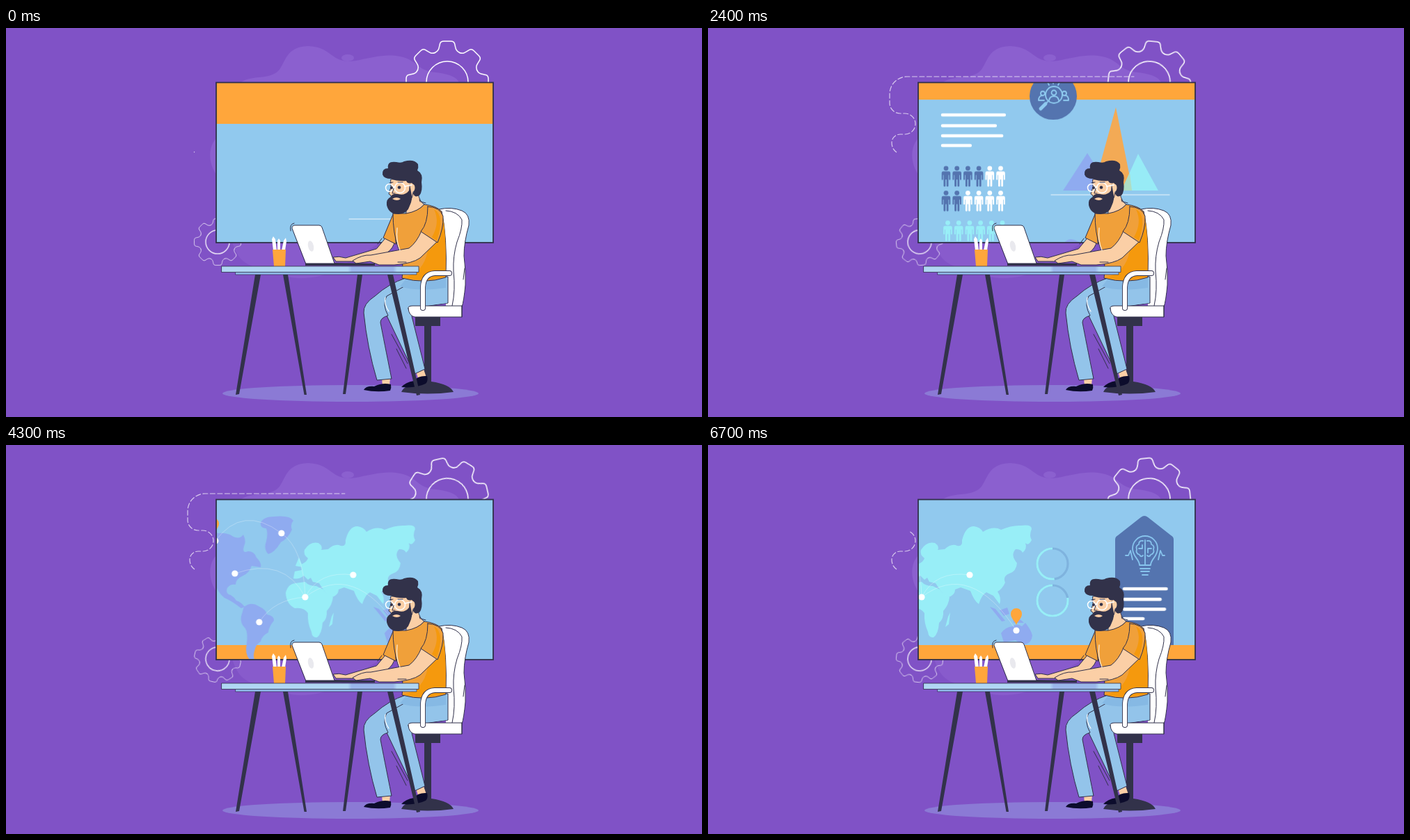
Animation, 1000 px wide and 560 px high, one loop 6.8 s. Source, as an HTML page without scripts:

```html
<!DOCTYPE html>
<html lang="en">
<head>
<meta charset="utf-8">
<title>Analyst at work</title>
<style>
html,body{margin:0;width:100%;height:100%;overflow:hidden;background:#8052c6}
svg{display:block;width:100%;height:100%}
.a{animation:6.8s linear infinite}
.ink{stroke:#30304a;stroke-width:1;stroke-linejoin:round;stroke-linecap:round}
.line{fill:none;stroke:#fff;stroke-linecap:round;stroke-linejoin:round}
.keep *{vector-effect:non-scaling-stroke}
.navy{fill:#5474af}.aqua{fill:#98eef7}.peri{fill:#8fabf0}.gold{fill:#ffa63b}.shirt{fill:#f0a03a}.skin{fill:#fbcfa6}.denim{fill:#93c4ea}.dark{fill:#32324a}.white{fill:#fff}

/* gears */
.spin{animation-name:spin}
@keyframes spin{0%{transform:rotate(0)}27.94%{transform:rotate(145deg)}41.18%{transform:rotate(218deg)}55.88%{transform:rotate(305deg)}63.24%{transform:rotate(347deg)}75%{transform:rotate(396deg)}98.53%{transform:rotate(534deg)}100%{transform:rotate(540deg)}}
.unspin{animation-name:unspin}
@keyframes unspin{0%{transform:rotate(0)}27.94%{transform:rotate(-145deg)}41.18%{transform:rotate(-218deg)}55.88%{transform:rotate(-305deg)}63.24%{transform:rotate(-347deg)}75%{transform:rotate(-396deg)}98.53%{transform:rotate(-534deg)}100%{transform:rotate(-540deg)}}

/* dashed trail grows, then winds back */
.trail{stroke-dasharray:600 700;animation-name:trail}
@keyframes trail{0%{stroke-dashoffset:599}27.94%{stroke-dashoffset:208.5}40.8%,47%{stroke-dashoffset:23.5}55.88%{stroke-dashoffset:134.5}63.24%{stroke-dashoffset:227.5}75%{stroke-dashoffset:378.5}98.53%{stroke-dashoffset:518}100%{stroke-dashoffset:522}}
.swoosh{stroke-dasharray:90 400;animation-name:swoosh}
@keyframes swoosh{0%,23.5%{stroke-dashoffset:91}27%,28.7%{stroke-dashoffset:0}32.4%,100%{stroke-dashoffset:-91}}
.chip{animation-name:chip}
@keyframes chip{0%,38.2%{transform:translate(440px,96px)}41.18%{transform:translate(464px,8px)}42.6%,100%{transform:translate(474px,-30px)}}

/* camera */
.pan-y{animation-name:pan-y}
@keyframes pan-y{0%,31%{transform:none;animation-timing-function:ease-in}41.18%{transform:translateY(-147px);animation-timing-function:ease-out}50%,100%{transform:translateY(-221px)}}
.pan-x{animation-name:pan-x}
@keyframes pan-x{0%,53%{transform:none}55.88%{transform:translateX(-3px);animation-timing-function:ease-in}63.24%{transform:translateX(-243px);animation-timing-function:ease-out}73.5%,100%{transform:translateX(-366px)}}

/* screen parts */
.badge{animation-name:badge}
@keyframes badge{0%,6%{transform:scale(0);animation-timing-function:ease-out}13%{transform:scale(1.1)}15.5%,100%{transform:none}}
.panel{animation-name:panel}
@keyframes panel{0%,15%{transform:translateX(-150px);animation-timing-function:ease-out}27.94%{transform:translateX(-26px);animation-timing-function:ease-out}34%,100%{transform:none}}
.peaks{animation-name:peaks}
@keyframes peaks{0%,29.5%{transform:scaleY(0);animation-timing-function:ease-out}38%,100%{transform:none}}
.arrow{animation-name:arrow}
@keyframes arrow{0%,41.5%{transform:translateX(-185px);animation-timing-function:ease-out}51%,100%{transform:none}}
.floor{animation-name:floor}
@keyframes floor{0%,64%{transform:scaleX(.77)}74%,100%{transform:none}}
.pin{animation-name:pin}
@keyframes pin{0%,44%{transform:scale(0);animation-timing-function:ease-out}50%,100%{transform:none}}
.blip{animation-name:blip}
@keyframes blip{0%,52%{transform:scale(0)}55.88%{transform:scale(.8)}62%,100%{transform:scale(0)}}
.house{animation-name:house}
@keyframes house{0%,65%{transform:translateY(200px)}75%{transform:translateY(12px);animation-timing-function:ease-out}79%,100%{transform:none}}
.rings{animation-name:rings}
@keyframes rings{0%,69%{transform:translateY(-190px)}75%{transform:translateY(-71px);animation-timing-function:ease-out}83%,100%{transform:none}}
.fill{stroke-dasharray:100 200;animation-name:fill}
@keyframes fill{0%,83%{stroke-dashoffset:100.5;animation-timing-function:ease-out}98%,100%{stroke-dashoffset:var(--to)}}
.idea{animation-name:idea}
@keyframes idea{0%,79%{transform:scale(0);animation-timing-function:ease-out}86%,100%{transform:none}}
.notes{animation-name:notes}
@keyframes notes{0%,82%{transform:scaleX(0);visibility:hidden;animation-timing-function:ease-out}82.1%{visibility:visible}93%,100%{transform:none;visibility:visible}}
</style>
</head>
<body>
<svg viewBox="0 0 1000 560">
<defs>
  <path id="tooth" d="M-17.6-42.5C-11.6-45-12-50-10.500-55.500Q-9.500-59-5-59H5Q9.500-59 10.500-55.500C12-50 11.600-45 17.600-42.500"/>
  <g id="teeth2"><use href="#tooth"/><use href="#tooth" transform="rotate(45)"/></g>
  <g id="gear" class="line keep" stroke-width="1.500">
    <use href="#teeth2"/><use href="#teeth2" transform="rotate(90)"/><use href="#teeth2" transform="rotate(180)"/><use href="#teeth2" transform="rotate(270)"/>
    <circle r="30"/>
  </g>
  <g id="person">
    <circle cy="3.800" r="3.400"/>
    <path d="M-6.300 10.500q0-2.200 2.200-2.200h8.200q2.200 0 2.200 2.200v9.500q-1 1.200-2 0v-6.500h-.8V29.500q-1.400 1.600-2.800 0V20h-1.400V29.500q-1.400 1.600-2.800 0V13.500h-.8v6.500q-1 1.200-2 0z"/>
  </g>
  <g id="pair"><use href="#person"/><use href="#person" x="15.700"/></g>
  <path id="notes" d="M0 0H96M0 15.500H82M0 30H92M0 44H43" class="line" stroke-width="4.600" vector-effect="non-scaling-stroke"/>
  <path id="pin" class="gold" d="M0 0C-2-6-8-9-8-16A8 8 0 0 1 8-16C8-9 2-6 0 0Z"/>
  <path id="ring" d="M0-22a22 22 0 0 0 0 44a22 22 0 0 0 0-44" pathLength="100"/>
  <path id="route" d="M271 179Q264 174 264 165A12 12 0 0 1 276 153H283A15 15 0 0 0 283 123H276A15 15 0 0 1 261 108V95A25 25 0 0 1 286 70H700"/>
  <mask id="reveal" maskUnits="userSpaceOnUse" x="0" y="0" width="1000" height="560">
    <use href="#route" class="a trail" fill="none" stroke="#fff" stroke-width="5"/>
  </mask>
  <clipPath id="pane"><path d="M302 79H700V309H302Z"/></clipPath>
  <linearGradient id="top"><stop offset=".64" stop-color="#b0d6f3"/><stop offset=".66" stop-color="#9ab6ea"/><stop offset=".87" stop-color="#9ab6ea"/><stop offset=".89" stop-color="#b0d6f3"/></linearGradient>
</defs>

<rect width="1000" height="560" fill="#8052c6"/>
<g fill="#8b60cf">
  <path d="M335 80C352 66 378 76 392 61C402 49 402 27 434 26C466 27 466 47 492 48C520 46 538 36 566 41C592 46 590 62 618 64C642 67 648 72 652 80Z"/>
  <ellipse cx="491" cy="43" rx="9" ry="5"/>
  <path d="M303 158C290 170 290 195 303 212Z"/>
  <path d="M325 308C335 340 350 344 380 348C405 364 440 364 470 350L540 308Z" fill="#885bcc"/>
</g>
<ellipse cx="495" cy="526" rx="184" ry="12" fill="#8b7ad5"/>

<g transform="translate(634 78)"><g class="a spin"><use href="#gear"/></g></g>
<g transform="translate(304 308) scale(.568)" opacity=".8"><g class="a unspin"><use href="#gear"/></g></g>
<use href="#route" class="line" stroke-width="1.200" stroke-dasharray="7 3.500" opacity=".7" mask="url(#reveal)"/>
<path class="a swoosh line" d="M398 362Q360 345 338 300" stroke-width="9" style="stroke-linecap:butt"/>
<g class="a chip"><path class="white" d="M-6-3L6-4L6 3L-5 4Z"/><path fill="#e6d5f5" d="M-6-3L-2-3L-1 4L-5 4Z"/></g>

<!-- screen -->
<g clip-path="url(#pane)">
  <rect x="302" y="78" width="398" height="231" fill="#91c9ee"/>

  <g class="a house">
    <path class="navy" d="M585 136Q585 132 589 130L622 104Q627 100 632 104L665 130Q669 132 669 136V330H585Z"/>
    <g transform="translate(628 156)"><g class="a idea line" style="stroke:#86c3ec" stroke-width="1.800">
      <path d="M-8 17C-8 8-18 5-18-7A18 18 0 0 1 18-7C18 5 8 8 8 17ZM-7 22H7M-6 26H6M-4 31H4M0-19V17"/>
      <path d="M-3-18Q-9-19-9-13Q-14-11-12-6Q-14 0-8 2Q-6 6-3 3M3-18Q9-19 9-13Q14-11 12-6Q14 0 8 2Q6 6 3 3M-9-7H-4V-12M9-7H4V-1"/>
      <path d="M-28 3H-24L-21-4L-18 9M28 3H25L22-4L19 9"/>
    </g></g>
    <g transform="translate(598 207)"><g class="a notes"><use href="#notes" transform="scale(.63 .98)"/></g></g>
  </g>

  <g class="a rings" fill="none" stroke-width="3.200">
    <g transform="translate(495 171)">
      <use href="#ring" stroke="#7fb3de"/><use href="#ring" class="a fill" stroke="#98eef7" style="--to:48"/>
    </g>
    <g transform="translate(495 224)">
      <use href="#ring" stroke="#7fb3de"/><use href="#ring" class="a fill" stroke="#98eef7" style="--to:22"/>
    </g>
  </g>

  <g class="a pan-y">
    <g transform="translate(302 509)"><rect class="a floor gold" width="400" height="24"/></g>
    <g class="a pan-x">
      <rect class="gold" x="302" y="78" width="398" height="60"/>
      <g transform="translate(496 133)"><g class="a badge">
        <circle class="navy" r="34"/>
        <g class="line" style="stroke:#8fcbf0" stroke-width="1.800">
          <circle cx="1" cy="-2" r="12"/><circle cx="1" cy="-5" r="3.500"/>
          <path d="M-6 6Q-5 0 1 0Q7 0 8 6M-8 8L-11 11M0-22V-18M-8-20L-6-16M9-20L7-16M-13 6H-21Q-21-1-15-1M15 6H22Q22-1 17-1"/>
          <circle cx="-15" cy="-4" r="3"/><circle cx="16" cy="-4" r="3"/>
          <path d="M-11 11L-18 18" stroke-width="5"/>
        </g>
      </g></g>

      <g class="a panel">
        <use href="#notes" transform="translate(337 160) scale(.925 1)"/>
        <g class="white">
          <g class="navy"><use href="#pair" x="342" y="233"/><use href="#pair" x="373.400" y="233"/><use href="#pair" x="342" y="268.500"/></g>
          <use href="#pair" x="404.800" y="233"/><use href="#pair" x="373.400" y="268.500"/><use href="#pair" x="404.800" y="268.500"/>
        </g>
      </g>
      <g class="white">
        <g class="aqua"><use href="#pair" x="344.500" y="311.500"/><use href="#pair" x="375.900" y="311.500"/><use href="#pair" x="407.300" y="311.500"/><use href="#pair" x="344.500" y="347"/></g>
        <use href="#pair" x="375.900" y="347"/><use href="#pair" x="407.300" y="347"/>
      </g>

      <path d="M493 275H663" class="line" stroke-width="1.200" opacity=".85"/>
      <g transform="translate(0 269)"><g class="a peaks">
        <path class="peri" d="M510 0L545-63L580 0Z"/>
        <path fill="#f3aa55" d="M553 0L586-140L610 0Z"/>
        <path fill="#98eef7" opacity=".93" d="M594 0L618-62L647 0Z"/>
        <path fill="#aeddc4" d="M594 0L606-30L609 0Z"/>
      </g></g>

      <g class="a arrow">
        <path class="navy" d="M200 424H441Q446 424 449 428L479 462Q482 466 479 470L449 504Q446 508 441 508H200Z"/>
        <use href="#notes" transform="translate(342 444)"/>
      </g>

      <!-- map -->
      <g transform="translate(243 221)">
        <g class="peri">
          <path d="M268 124Q276 114 288 121L305 127Q313 126 322 129Q335 138 341 129Q346 138 342 146Q339 157 348 153Q357 153 360 162Q368 170 366 176L353 174Q350 184 341 188Q330 193 330 201Q322 200 318 206Q315 214 323 216Q328 219 331 224Q338 226 343 233L338 235Q324 224 314 220Q304 212 300 198Q288 196 290 178Q284 158 272 150Q266 144 272 138Z"/>
          <path d="M366 112Q370 103 386 103Q408 101 413 109Q408 114 411 122Q405 135 395 140Q386 155 377 157Q370 150 374 139Q377 126 374 120Q365 120 366 112Z"/>
          <path d="M342 233Q353 225 363 232Q374 237 375 244Q386 246 385 253Q378 261 377 270Q368 274 366 283Q359 287 357 297Q355 304 357 308L350 309Q343 300 346 286Q348 270 344 264Q336 256 338 247Z"/>
          <path d="M528 233L536 236L550 253L545 254ZM542 238L553 234L556 243L548 246ZM560 247Q572 250 577 256L562 256Z"/>
          <path d="M544 271Q550 262 561 261Q566 256 574 261L579 256Q587 266 589 274Q588 285 579 287Q570 285 565 281L548 284Z"/>
        </g>
        <g class="aqua">
          <path d="M413 192L415 182L425 180L424 172Q433 168 434 163Q427 158 429 151Q437 138 449 141Q456 146 453 151L463 150Q473 141 481 145Q489 147 488 137Q493 117 505 117Q514 118 518 125Q533 116 544 122Q560 115 573 116Q588 114 588 121Q584 130 588 137Q583 146 579 141Q582 149 575 155Q573 150 565 150Q557 158 567 170Q566 182 556 185Q546 189 550 198Q546 207 539 211Q545 220 542 229L533 217L523 212Q516 216 512 229Q505 224 500 210L486 205L478 208Q478 217 465 220Q456 209 450 199L441 197L438 191L434 194L428 188Q421 194 413 192Z"/>
          <path d="M402 213Q405 200 416 199L430 197Q435 203 446 203L456 208Q462 217 470 219Q469 230 461 239Q462 250 455 256Q454 272 447 277Q440 278 439 269Q433 256 434 242Q428 233 415 235Q403 229 402 213Z"/>
          <path d="M416 174L421 162L427 176ZM468 247L471 241L469 258L464 262Z"/>
        </g>
        <path class="line" stroke-width="1" opacity=".3" d="M301 138Q340 85 396 127Q428 150 430 219Q400 160 329 185M364 255Q385 222 430 219Q450 180 499 187M430 219Q500 165 566 267"/>
        <g class="white"><circle cx="301" cy="138" r="4.600"/><circle cx="396" cy="127" r="4.600"/><circle cx="329" cy="185" r="4.600"/><circle cx="364" cy="255" r="4.600"/><circle cx="430" cy="219" r="4.600"/><circle cx="499" cy="187" r="4.600"/><circle cx="566" cy="267" r="4.600"/></g>
        <g transform="translate(298 129)"><use href="#pin" class="a pin"/></g>
        <g transform="translate(364 249)"><use href="#pin" class="a blip"/></g>
        <g transform="translate(566 259)"><use href="#pin" class="a pin"/></g>
      </g>
    </g>
  </g>
</g>
<rect x="302" y="78.500" width="398" height="230.500" fill="none" stroke="#30304a" stroke-width="1.800"/>

<!-- chair -->
<path class="white" d="M618 261Q640 257 655 263Q667 268 665 284Q658 308 658 328Q661 350 660 370Q658 392 655 402H632V320Z"/>
<path fill="none" class="ink" d="M622 261Q640 257 655 263Q667 268 665 284Q658 308 658 328Q661 350 660 370Q658 392 655 402M632 263Q649 264 655 276Q656 288 648 308Q642 328 643 350Q646 378 641 400M659 346L657 362"/>
<path class="dark" d="M588 416H624V429H611V509Q638 513 643 524Q606 529 568 524Q572 513 601 509V429H588Z"/>

<!-- legs -->
<path class="skin" d="M540 504L552 503L551 515L541 516ZM589 494L600 491L604 503L592 504Z"/>
<path fill="#0c0c2c" d="M514 521Q517 515 529 516Q541 510 553 513Q554 518 552 522Q532 525 514 521ZM568 517Q574 510 586 508Q592 500 605 501Q607 508 603 512Q588 519 568 517Z"/>
<g class="denim ink">
  <path d="M545 385Q538 398 546 412L587 498L602 491L583 415Q584 406 595 402L635 396V358H575Z"/>
  <path d="M574 360Q550 368 530 386Q513 397 514 410Q519 460 533 507L554 505Q543 450 538 424Q538 417 549 414Q540 398 547 386L590 362Z"/>
</g>
<path class="denim" d="M572 362H634V396L590 401L570 385L584 364Z"/>
<path fill="#86b9e4" d="M566 372Q590 380 632 374V360H576Z"/>
<path fill="none" class="ink" d="M554 441L577 483M561 462L575 490"/>
<path class="line" stroke-width="1.200" d="M545 388Q543 398 550 408"/>

<!-- torso and arms -->
<g class="ink">
  <path class="skin" d="M546 302L558 310Q553 323 540 327L500 336H474L470 330Q478 328 488 331L532 318Z"/>
  <path class="shirt" d="M557 266L542 302L560 311Z"/>
  <path class="skin" d="M578 238L592 238Q594 250 601 254Q590 266 575 268Z"/>
  <path class="shirt" d="M556 267L575 267Q592 264 601 254Q618 256 626 264Q634 300 632 359Q602 369 569 360Q573 335 563 315Q556 295 556 267Z"/>
  <path fill="#f5990d" stroke="none" d="M621 262Q628 268 629 280Q633 310 631 358Q602 367 570 359Q600 354 606 320Z"/>
  <path class="skin" d="M597 292Q590 309 579 317L524 327Q512 326 498 335L503 339L523 336L536 341H558Q584 339 595 331L621 306Z"/>
  <path class="shirt" d="M606 257Q624 258 628 271Q629 288 620 309L596 293Q606 282 606 257Z"/>
</g>
<path fill="#f5990d" d="M615 261Q631 270 619 306L612 301Q624 280 615 261Z"/>
<path class="line" stroke-width="1.300" d="M562 288Q560 306 566 320" opacity=".8"/>

<!-- seat and armrest -->
<g class="ink">
  <path class="white" d="M578 404Q577 400 584 400H655V416H587Q579 414 578 404Z"/>
  <path fill="none" d="M655 400V416"/>
  <path fill="none" style="stroke-width:8" d="M599 403V373Q600 354 616 353H637"/>
  <path class="line" style="stroke:#fff;stroke-width:6.200" d="M599 403V373Q600 354 616 353H637"/>
</g>

<!-- head -->
<path class="skin ink" d="M553 218L582 216Q588 226 584 242L576 262L555 258L553 241L550 239L553 229Z"/>
<path class="dark" d="M541 211Q540 202 549 202Q547 191 561 193Q568 195 572 192Q586 188 592 196Q593 201 591 205Q600 210 597 222Q599 235 594 241Q587 245 585 238Q589 228 583 223Q577 225 575 220Q562 221 553 217Q543 217 541 211Z"/>
<ellipse class="skin" cx="584" cy="230" rx="3.500" ry="5.500"/>
<path class="dark" d="M580 224L579 234Q573 242 563 239Q555 238 553 243Q546 246 547 255Q550 268 564 268Q577 267 580 256Q585 246 582 236Z"/>
<path class="skin" d="M555 246Q561 242 567 246Q562 250 555 246Z"/>
<g class="line" stroke-width="1.500"><circle cx="551" cy="230" r="5.500"/><circle cx="566" cy="230" r="7.500"/><path d="M556 229H559M573 228L583 226"/></g>
<circle class="dark" cx="554" cy="230" r="2"/><circle class="dark" cx="565" cy="229.500" r="2.300"/>
<path class="ink" fill="none" d="M551 223L556 222M563 222L570 222M557 231L555 238L559 238M594 247L595 250M596 250L603 252"/>

<!-- desk -->
<g class="dark">
  <path d="M358 355H366L335 527L330 528ZM398 355H405L432 528H428.500ZM505 355H512L488 527H484ZM548 355H556L595 528L590 529Z"/>
  <path d="M430 338H470L530 339V342H430Z"/>
</g>
<path class="white ink" d="M411 288Q411 284 415 284H450Q453 284 454 287L472 339H431Z"/>
<path fill="none" class="ink" d="M409 292Q407 282 414 281M534 311L540 303M563 337H575"/>
<ellipse cx="438" cy="314" rx="4" ry="8" fill="#e9e9ee" transform="rotate(-12 438 314)"/>
<path class="white" d="M384 320L382 304L384 300L387 304L389 320ZM390 320V306L392 303L394 306V320ZM396 320L399 306L402 302L403 307L401 320Z"/>
<path class="gold" d="M383 319H402L401 343H385Z"/>
<path d="M330 351H590V355H330Z" fill="#8fb8e8" class="ink" style="stroke-width:.6"/>
<path d="M310 343H593V351.500H310Z" fill="url(#top)" class="ink" style="stroke-width:.8"/>
</svg>
</body>
</html>
```
